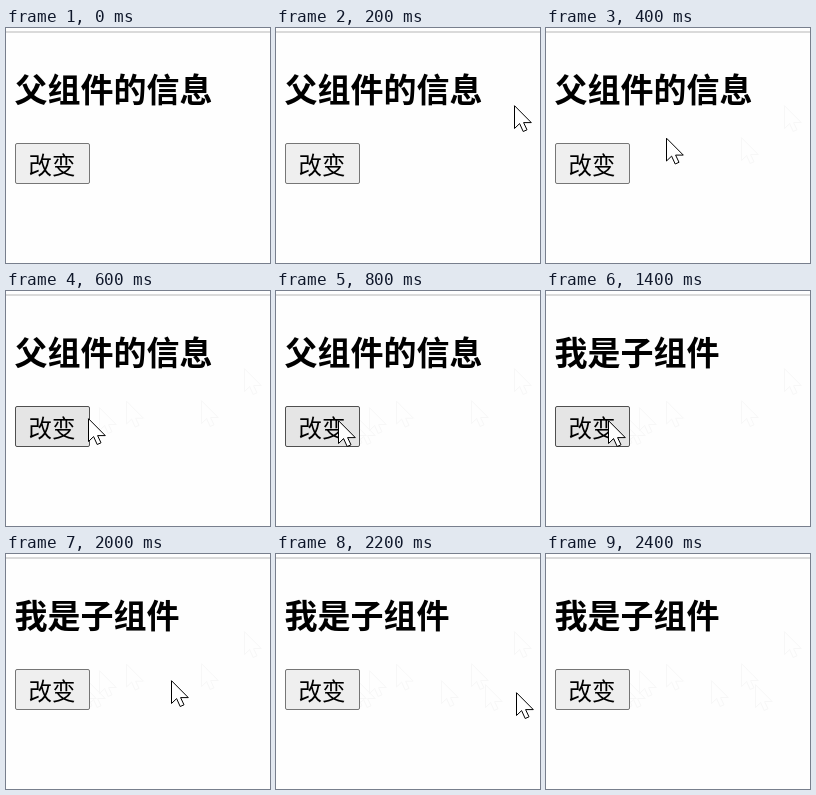
These frames come from a looping animation (264x235 px, 2.7 s). An HTML page:

```html
<!DOCTYPE html>
<html lang="zh-CN">
<head>
<meta charset="utf-8">
<title>父子组件</title>
<style>
  html, body { margin: 0; width: 100%; height: 100%; overflow: hidden; background: #fefefe; }
  svg { display: block; width: 100vw; height: 100vh; }
  text { font-family: "Noto Sans CJK SC", "Noto Sans CJK", sans-serif; fill: #000; }
  #title { font-size: 33px; font-weight: 700; }
  #label { font-size: 23.4px; font-weight: 300; }
  #ghosts use { fill: none; stroke: #f7f7f7; }
  #cursor { fill: #fff; stroke: #000; }
</style>
</head>
<body>
<svg viewBox="0 0 264 235">
  <defs>
    <path id="arrow" d="M.5 .7V23.5L5.6 18.6L9.2 26.5L13 24.8L9.6 17.6H17.3Z"/>
  </defs>
  <rect y="3" width="264" height="2" fill="#dadada"/>
  <g id="ghosts"></g>
  <text id="title" x="8.6" y="73.6"></text>
  <rect id="button" x="9.5" y="115.5" width="74" height="40" rx="1.5"/>
  <text id="label" x="22.6" y="145.6">改变</text>
  <use id="cursor" href="#arrow"/>
</svg>
<script>
const LOOP = 2700;
const byId = id => document.getElementById(id);
const [title, button, cursor, ghosts] = ['title', 'button', 'cursor', 'ghosts'].map(byId);

// start time, cursor x, y, whether a faint trail stays behind
const path = [
  [200, 238, 77, true],
  [300, 195, 109, true],
  [400, 120, 109.5, true],
  [500, 93, 116, true],
  [600, 82, 127, true],
  [700, 73, 127, true],
  [800, 62, 129, false],
  [2000, 165, 126, true],
  [2100, 209, 130, true],
  [2200, 240, 138, false],
  [2300, 256, 145, false],
  [2400, 300, 145, false]
];

// start time, fill, border
const buttonStates = [
  [0, '#efefef', '#767676'],
  [600, '#e5e5e5', '#4f4f4f'],
  [1300, '#f5f5f5', '#8d8d8d'],
  [1400, '#e5e5e5', '#4f4f4f'],
  [2000, '#efefef', '#767676']
];

const titles = [[0, '父组件的信息'], [1400, '我是子组件']];

const stepAt = (steps, t) => steps.findLast(([start]) => start <= t);
const place = (el, x, y) => el.setAttribute('transform', `translate(${x} ${y})`);
const show = (el, on) => el.setAttribute('visibility', on ? 'visible' : 'hidden');

const trail = path.flatMap(([, x, y, stays], i) => {
  if (!stays) return [];
  const el = document.createElementNS('http://www.w3.org/2000/svg', 'use');
  el.setAttribute('href', '#arrow');
  place(el, x, y);
  ghosts.append(el);
  return [{ el, from: path[i + 1][0] }];
});

function draw(t) {
  const pose = stepAt(path, t);
  show(cursor, pose);
  if (pose) place(cursor, pose[1], pose[2]);

  const [, fill, border] = stepAt(buttonStates, t);
  button.setAttribute('fill', fill);
  button.setAttribute('stroke', border);

  title.textContent = stepAt(titles, t)[1];
  for (const { el, from } of trail) show(el, t >= from);
}

const start = performance.now();
function tick() {
  draw((performance.now() - start) % LOOP);
  requestAnimationFrame(tick);
}
tick();
</script>
</body>
</html>
```
